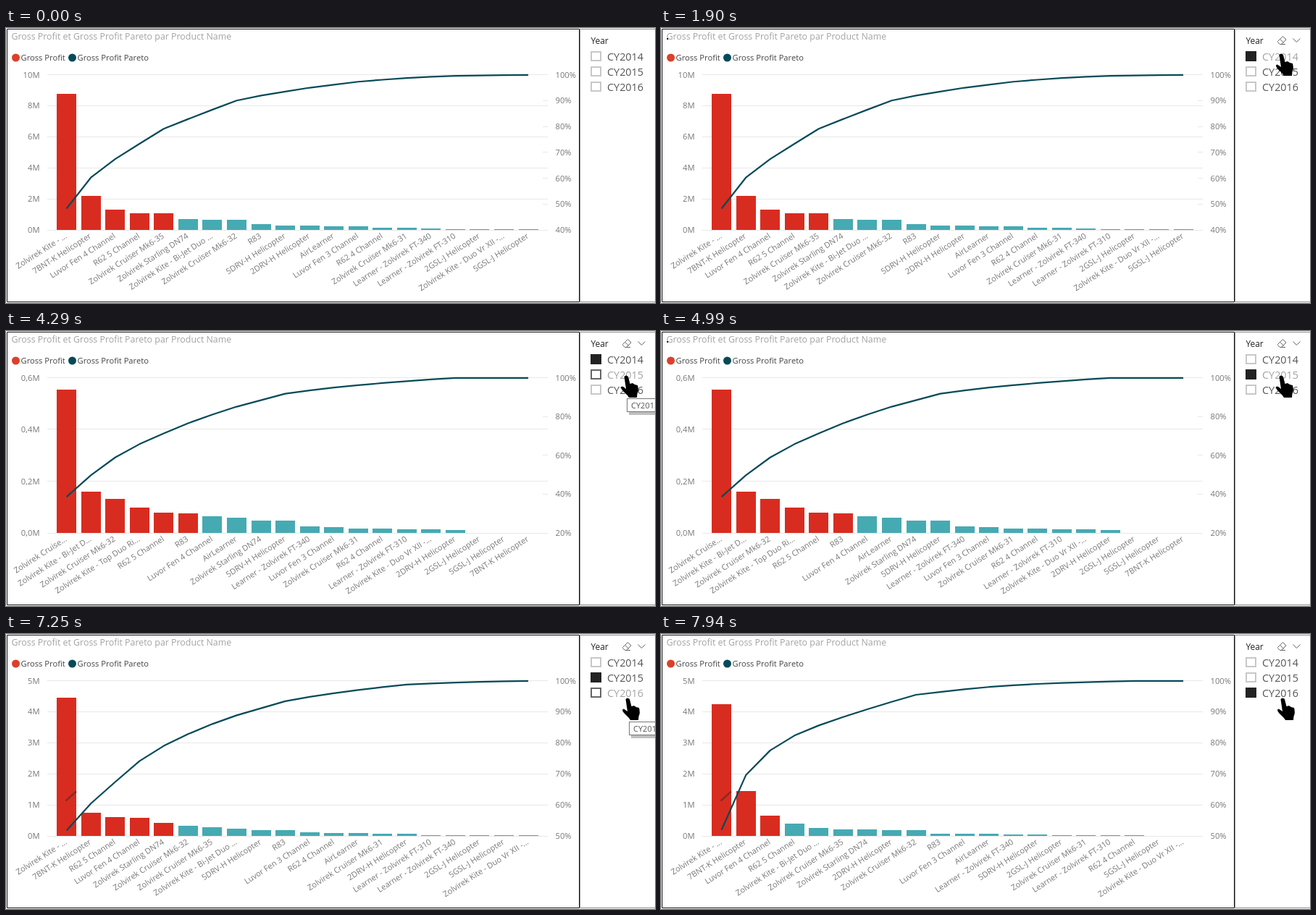
Animation, 896 px wide and 380 px high, one loop 8 s. Source, as an HTML page:

```html
<!DOCTYPE html>
<html lang="fr">
<head>
<meta charset="utf-8">
<title>Pareto</title>
<style>
html, body { margin: 0; width: 100%; height: 100%; overflow: hidden; background: #fff; }
svg { display: block; width: 896px; height: 380px; font: 11.2px "Open Sans", "Noto Sans", sans-serif; }
rect { shape-rendering: crispEdges; }
</style>
</head>
<body>
<svg id="stage" viewBox="0 0 896 380"></svg>
<script>
const LOOP = 8000;
const TOP = 64.5, BASE = 279, FIRST = 83.6, PITCH = 33.55, BAR = 27;
const RED = '#d92c20', TEAL = '#46aab3', NAVY = '#064a58', GREY = '#777';
const stage = document.getElementById('stage');

function add(parent, tag, attrs = {}, text) {
  const el = document.createElementNS('http://www.w3.org/2000/svg', tag);
  set(el, attrs);
  if (text) el.textContent = text;
  return parent.appendChild(el);
}
function set(el, attrs) {
  for (const key in attrs) el.setAttribute(key, attrs[key]);
}
const show = (el, on) => set(el, { visibility: on ? 'visible' : 'hidden' });

// Products are addressed by letter: a is the first name, b the second...
const names = [
  'Zolvirek Kite - ...', '7BNT-K Helicopter', 'Luvor Fen 4 Channel', 'R62 5 Channel',
  'Zolvirek Cruiser Mk6-35', 'Zolvirek Starling DN74', 'Zolvirek Kite - Bi-Jet Duo ...',
  'Zolvirek Cruiser Mk6-32', 'R83', '5DRV-H Helicopter', '2DRV-H Helicopter', 'AirLearner',
  'Luvor Fen 3 Channel', 'R62 4 Channel', 'Zolvirek Cruiser Mk6-31', 'Learner - Zolvirek FT-340',
  'Learner - Zolvirek FT-310', '2GSL-J Helicopter', 'Zolvirek Kite - Duo Vr XII -...',
  '5GSL-J Helicopter', 'Zolvirek Cruise...', 'Zolvirek Kite - Bi-Jet D...',
  'Zolvirek Kite - Top Duo Ri...'
];

const charts = [
  { order: 'abcdefghijklmnopqrst', max: 10, step: 2, low: 40, percent: 10, reds: 5,
    values: [8.77, 2.17, 1.3, 1.07, 1.05, .68, .66, .64, .35, .28, .27, .21, .21, .14, .12, .09, .06, .03, .02, .02] },
  { order: 'uvhwdiclfjpmonqskrtb', max: .6, step: .2, low: 20, percent: 20, reds: 6, digits: 1,
    values: [.553, .159, .131, .098, .079, .075, .064, .058, .048, .048, .024, .021, .017, .016, .014, .013, .011, 0, 0, 0] },
  { order: 'abdcfhegjimnlokqprts', max: 5, step: 1, low: 50, percent: 10, reds: 5, trace: true,
    values: [4.45, .745, .595, .58, .42, .325, .28, .24, .195, .195, .12, .1, .09, .08, .07, .03, .025, .02, .015, .012] },
  { order: 'abcdgefkhimlpjroqnts', max: 5, step: 1, low: 50, percent: 10, reds: 3, trace: true,
    values: [4.24, 1.435, .65, .39, .265, .22, .205, .195, .185, .075, .07, .06, .045, .035, .025, .02, .02, .015, 0, 0] }
];

function drawChart(c) {
  const g = add(stage, 'g');
  const yOf = share => BASE - share * (BASE - TOP);
  const rule = (x, y) => add(g, 'path', { d: `M${x} ${Math.round(y) + .5}H748`, stroke: '#e8e8e8' });

  for (let i = 0; i <= Math.round(c.max / c.step); i++) {
    const value = i * c.step, y = yOf(value / c.max);
    rule(57, y - .5);
    const label = value.toFixed(c.digits || 0).replace('.', ',') + 'M';
    add(g, 'text', { x: 46.5, y: y + 4, 'text-anchor': 'end', fill: GREY }, label);
  }
  for (let p = c.low; p <= 100; p += c.percent) {
    const y = yOf((p - c.low) / (100 - c.low));
    rule(741, y - .5);
    add(g, 'text', { x: 758.5, y: y + 4, fill: GREY }, p + '%');
  }

  const total = c.values.reduce((a, b) => a + b);
  let sum = 0;
  const points = c.values.map((value, i) => {
    const x = FIRST + i * PITCH;
    const height = value && Math.max(1, BASE - yOf(value / c.max));
    add(g, 'rect', { x: x - BAR / 2, y: BASE - height, width: BAR, height, fill: i < c.reds ? RED : TEAL });
    add(g, 'text', {
      transform: `translate(${x + 1.2} 289.3) rotate(-32.8)`, 'text-anchor': 'end', 'font-size': 11, fill: GREY
    }, names[c.order.charCodeAt(i) - 97]);
    sum += value;
    return [x, yOf((100 * sum / total - c.low) / (100 - c.low)) + .3];
  });
  if (c.trace) add(g, 'path', { d: 'M82.5 230.5L97 217.5', stroke: '#8c2a25', 'stroke-width': 2.6 });
  add(g, 'polyline', {
    points: points.join(' '), fill: 'none', stroke: NAVY, 'stroke-width': 2.2, 'stroke-linejoin': 'round'
  });
  return g;
}

const chartGroups = charts.map(drawChart);

// Frames, title and legend
add(stage, 'path', { d: 'M1.5 1.5H791.5V378.5H1.5Z', fill: 'none', stroke: '#111' });
add(stage, 'path', { d: 'M896 1.5H792.5V378.5H896', fill: 'none', stroke: '#888' });
add(stage, 'text', { x: 7.5, y: 16.3, 'font-size': 12.4, fill: '#a3a3a3' },
  'Gross Profit et Gross Profit Pareto par Product Name');
[[13.5, '#dc4029', 'Gross Profit'], [91.5, NAVY, 'Gross Profit Pareto']].forEach(([x, fill, text]) => {
  add(stage, 'circle', { cx: x, cy: 41, r: 5.5, fill });
  add(stage, 'text', { x: x + 7, y: 45, fill: '#444' }, text);
});
const busyDot = add(stage, 'rect', { x: 8, y: 14, width: 2, height: 2, fill: '#222' });

// Slicer panel
add(stage, 'text', { x: 807.5, y: 21.5, 'font-size': 11.9, fill: '#222' }, 'Year');
const tools = add(stage, 'g', { fill: 'none', stroke: '#666' });
add(tools, 'path', { d: 'M851.5 18.5L858.5 11.5L863 16L856.5 22.5H854.5L851.5 19.5ZM854.5 15.5L859.5 20M856 22.5H862' });
add(tools, 'path', { d: 'M872.5 14.5L877.5 19.5L882.5 14.5' });
const options = ['CY2014', 'CY2015', 'CY2016'].map((text, i) => ({
  box: add(stage, 'rect', { x: 808, y: 33 + 21 * i, width: 13, height: 12, 'stroke-width': 2 }),
  label: add(stage, 'text', { x: 830, y: 44.7 + 21 * i, 'font-size': 14.4 }, text)
}));

const tip = add(stage, 'g');
add(tip, 'rect', { x: 3, y: 3, width: 60, height: 20, fill: '#000', opacity: .25 });
add(tip, 'rect', { x: .5, y: .5, width: 58, height: 18, fill: '#fff', stroke: '#777' });
const tipText = add(tip, 'text', { x: 6, y: 13.5, 'font-size': 11, fill: '#555' });

const hand = add(stage, 'path', {
  d: 'M-2.5 1Q0 -2 3 1L5.5 11L9 10L12 12L16 13Q18 20 15.5 25L15 30H4L2 27L-5 20Q-9 15 -5 14.5L0 18Z',
  fill: '#000'
});

// Each step changes only the listed properties.
const steps = [[0, { chart: 0, checked: -1, hover: -1, hand: null, tip: 0, busy: false }]];
const at = (t, change) => steps.push([t, change]);
const track = (times, key, values) => times.forEach((t, i) => at(t, { [key]: values[i] }));

track([1350, 1440, 1520], 'hand', [[877, 54], [863, 41], [856, 36]]);
at(1440, { hover: 0 });
at(1820, { checked: 0 });
at(1900, { busy: true });
at(1980, { busy: false, chart: 1 });

track([3370, 3450, 3530, 3600, 3680, 3760], 'hand',
  [[856, 38], [856, 44], [856, 51], [856, 57], [856, 60], [856, 62]]);
at(3370, { hover: -1 });
at(3530, { hover: 1 });
track([4150, 4220, 4290], 'tip', [.35, .7, 1]);
at(4690, { checked: 1 });
track([4690, 4770, 4840], 'tip', [.7, .35, 0]);
at(4990, { busy: true });
at(5060, { chart: 2 });
at(5140, { busy: false });

track([6300, 6380, 6460, 6530, 6610, 6690], 'hand',
  [[856, 64], [857, 69], [857, 76], [858, 82], [858, 87], [858, 89]]);
at(6300, { hover: -1 });
at(6460, { hover: 2 });
track([7080, 7160, 7250], 'tip', [.35, .7, 1]);
at(7550, { checked: 2 });
track([7550, 7630, 7710], 'tip', [.7, .35, 0]);
at(7860, { chart: 3 });
at(7940, { hover: -1 });

function render(t) {
  const s = {};
  for (const [start, change] of steps) if (start <= t) Object.assign(s, change);

  chartGroups.forEach((g, i) => show(g, i === s.chart));
  show(busyDot, s.busy);
  show(tools, s.hand);
  show(hand, s.hand);
  if (s.hand) set(hand, { transform: `translate(${s.hand})` });
  options.forEach(({ box, label }, i) => {
    const on = i === s.checked, over = i === s.hover;
    set(box, { fill: on ? '#222' : '#fff', stroke: on ? '#222' : over ? '#666' : '#c8c8c8' });
    set(label, { fill: over ? '#a3a3a3' : '#555' });
  });
  const third = t > 6000;
  set(tip, { opacity: s.tip, transform: third ? 'translate(860 121)' : 'translate(857 93)' });
  tipText.textContent = third ? 'CY2016' : 'CY2015';
}

function tick() {
  render(performance.now() % LOOP);
  requestAnimationFrame(tick);
}
tick();
</script>
</body>
</html>
```
